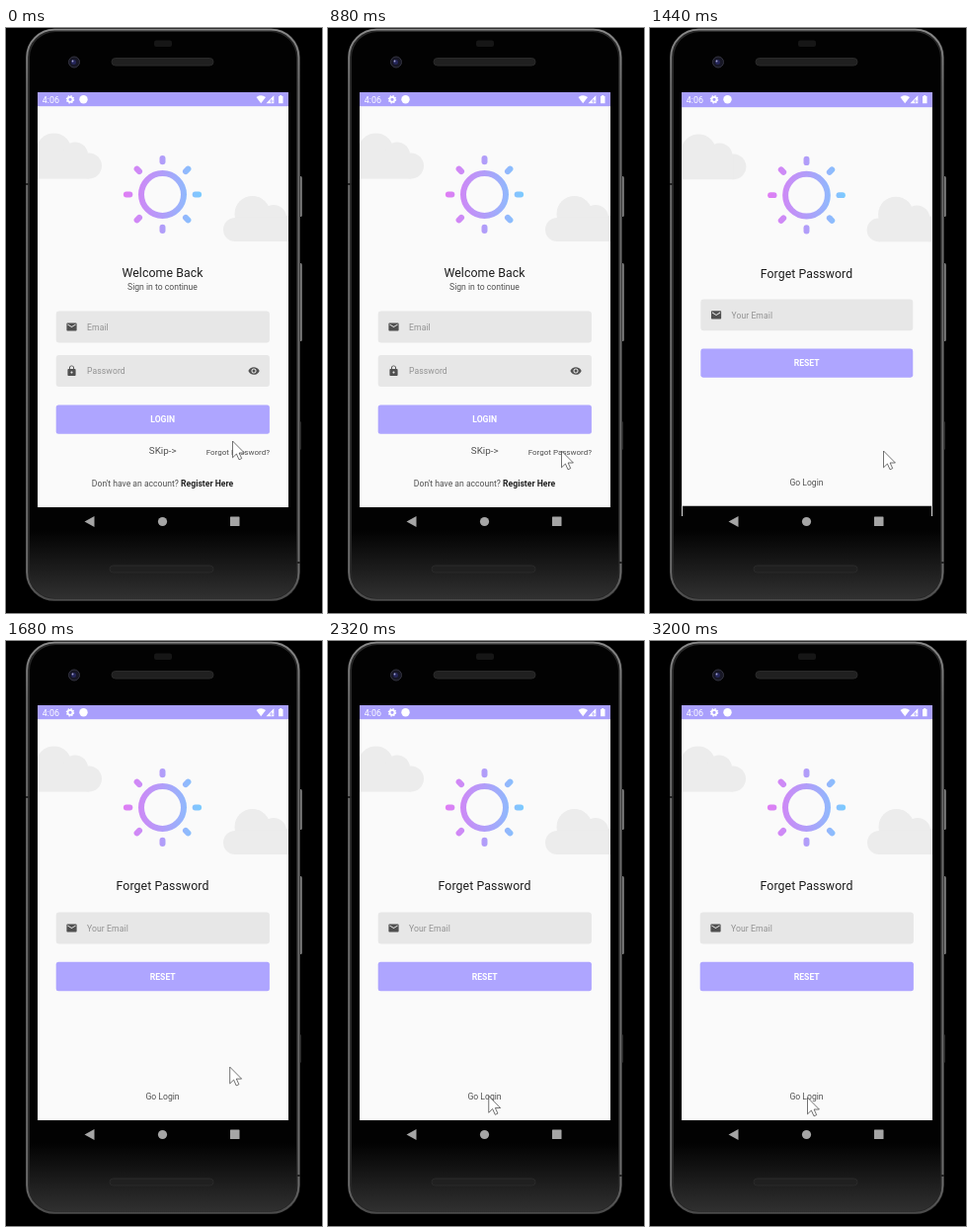
Animation, 320 px wide and 592 px high, one loop 3.28 s. Source, as an HTML page:

```html
<!DOCTYPE html>
<html lang="en">
<head>
<meta charset="utf-8">
<title>Login and password reset</title>
<style>
  html, body { margin: 0; width: 100%; height: 100%; overflow: hidden; background: #000; }
  svg { display: block; width: 320px; height: 592px; }
  text { font: 8.62px Roboto, sans-serif; fill: #505050; }
  .mid { text-anchor: middle; }
  .title { font-size: 12.31px; letter-spacing: .09px; fill: #1c1c1c; }
  .hint { letter-spacing: .1px; fill: #929292; }
  .button { font-weight: 700; fill: #fff; }
  .bold { font-weight: 700; fill: #222; }
</style>
</head>
<body>
<svg viewBox="0 0 320 592" xmlns="http://www.w3.org/2000/svg">
  <defs>
    <linearGradient id="sunFill" gradientUnits="userSpaceOnUse" x1="119" y1="0" x2="198" y2="0">
      <stop stop-color="#e07df4"/><stop offset=".5" stop-color="#b19df9"/><stop offset="1" stop-color="#7bcbff"/>
    </linearGradient>
    <linearGradient id="rim" x1="0" y1="0" x2="0" y2="1">
      <stop stop-color="#8a8a8a"/><stop offset=".1" stop-color="#6c6c6c"/>
      <stop offset=".95" stop-color="#6c6c6c"/><stop offset="1" stop-color="#4a4a4a"/>
    </linearGradient>
    <linearGradient id="glass" x1="0" y1="0" x2="0" y2="1">
      <stop stop-color="#020202"/><stop offset=".88" stop-color="#020202"/><stop offset="1" stop-color="#303030"/>
    </linearGradient>
    <linearGradient id="key" x1="0" y1="0" x2="1" y2="0">
      <stop stop-color="#444"/><stop offset=".6" stop-color="#8c8c8c"/><stop offset="1" stop-color="#555"/>
    </linearGradient>
    <clipPath id="screen"><rect x="32" y="65" width="254" height="420"/></clipPath>
    <path id="mail" d="M20 4H4c-1.1 0-2 .9-2 2v12c0 1.1.9 2 2 2h16c1.1 0 2-.9 2-2V6c0-1.1-.9-2-2-2zm0 4l-8 5-8-5V6l8 5 8-5v2z"/>
    <path id="lock" d="M18 8h-1V6c0-2.76-2.24-5-5-5S7 3.24 7 6v2H6c-1.1 0-2 .9-2 2v10c0 1.1.9 2 2 2h12c1.1 0 2-.9 2-2V10c0-1.1-.9-2-2-2zm-6 9c-1.1 0-2-.9-2-2s.9-2 2-2 2 .9 2 2-.9 2-2 2zm3.1-9H8.9V6c0-1.71 1.39-3.1 3.1-3.1s3.1 1.39 3.1 3.1v2z"/>
    <path id="eye" d="M12 4.5C7 4.5 2.73 7.61 1 12c1.73 4.39 6 7.5 11 7.5s9.27-3.11 11-7.5c-1.73-4.39-6-7.5-11-7.5zM12 17c-2.76 0-5-2.24-5-5s2.24-5 5-5 5 2.24 5 5-2.24 5-5 5zm0-8c-1.66 0-3 1.34-3 3s1.34 3 3 3 3-1.34 3-3-1.34-3-3-3z"/>
    <g id="cloud" fill="#ececec">
      <circle cx="31" cy="140.5" r="12"/>
      <circle cx="48.5" cy="124.5" r="18"/>
      <circle cx="70" cy="128.5" r="13"/>
      <circle cx="84" cy="139.5" r="13"/>
      <rect x="31" y="128" width="53" height="24.5"/>
    </g>
    <g id="backdrop">
      <rect x="32" y="65" width="254" height="420" fill="#fafafa"/>
      <use href="#cloud"/>
      <use href="#cloud" x="201" y="63.5"/>
      <g id="sun" fill="none" stroke="url(#sunFill)" stroke-width="6" stroke-linecap="round">
        <circle cx="158.5" cy="168.5" r="21.5"/>
      </g>
    </g>
  </defs>

  <rect width="320" height="592"/>
  <g fill="url(#key)">
    <rect x="295" y="150" width="5" height="41" rx="1.5"/>
    <rect x="295" y="238" width="5" height="79" rx="1.5"/>
    <rect x="295" y="398" width="3.5" height="29" rx="1"/>
  </g>
  <rect x="20" y="0.5" width="278" height="579.5" rx="29" fill="#262626"/>
  <rect x="21.2" y="1.7" width="275.2" height="577" rx="28" fill="none" stroke="url(#rim)" stroke-width="1.8"/>
  <rect x="24" y="4" width="270" height="573" rx="26" fill="url(#glass)"/>
  <g fill="#222">
    <rect x="20" y="157" width="3.5" height="2"/>
    <rect x="294.5" y="540" width="3.5" height="2"/>
  </g>
  <rect x="150" y="12.5" width="18" height="6.5" rx="2" fill="#161616"/>
  <rect x="107" y="30.5" width="103" height="7.5" rx="3.75" fill="#202020" stroke="#2a2a2a"/>
  <rect x="105" y="544" width="105" height="7" rx="3.5" fill="#202020" stroke="#2a2a2a"/>
  <circle cx="69" cy="34.5" r="5.5" fill="#171725" stroke="#343440"/>
  <circle cx="68.5" cy="34.5" r="2.5" fill="#25265a"/>
  <circle cx="67.5" cy="33.5" r=".9" fill="#aaaad4"/>

  <g fill="#a5a5a5">
    <path d="M79.5 499.5L89.5 494V505Z"/>
    <circle cx="158.5" cy="499.5" r="4.6"/>
    <rect x="227" y="494.5" width="9.5" height="9.5" rx=".6"/>
  </g>

  <g clip-path="url(#screen)">
    <rect x="32" y="65" width="254" height="420"/>
    <g id="login"><use href="#backdrop"/></g>
    <g id="reset"><use href="#backdrop"/></g>
  </g>
  <path id="edges" d="M32.5 80V494M285.5 80V494" stroke="#ddd"/>

  <rect id="status" x="32" y="65" width="254" fill="#a99ffc"/>
  <text x="36.8" y="75.5" style="font-size:8.9px;fill:#fff">4:06</text>
  <g fill="none" stroke="#fff">
    <circle cx="65" cy="72.3" r="2.5" stroke-width="1.8"/>
    <circle cx="65" cy="72.3" r="3.6" stroke-width="1.3" stroke-dasharray="1.41"/>
  </g>
  <g fill="#fff">
    <circle cx="78.5" cy="72.2" r="4.2"/>
    <path d="M253.5 70Q258.2 66.5 263 70L258.2 76.2Z"/>
    <path d="M263.5 76.2L271.3 68.2V76.2Z"/>
    <path d="M276 69H277.2V68H279.3V69H280.5V76.3H276Z"/>
  </g>
  <path d="M268.7 72V76M267 74H271" stroke="#a99ffc" stroke-width=".7"/>

  <path id="cursor" d="M0 0V16.8L3.9 13L6.5 18.8L9.2 17.6L6.6 12H11.9Z" fill="#fff" stroke="#444" stroke-width=".75"/>
</svg>
<script>
const LOOP = 3280, STEP = 80, OPEN_AT = 1360;
const $ = id => document.getElementById(id);

const add = (id, markup) => $(id).insertAdjacentHTML('beforeend', markup);
const label = (x, y, text, type = '', style = '') =>
  `<text x="${x}" y="${y}" class="${type}" style="${style}">${text}</text>`;
const icon = (name, x, y) =>
  `<use href="#${name}" fill="#505050" transform="translate(${x} ${y}) scale(.51) translate(-12 -12)"/>`;
const field = (y, name, hint) =>
  `<rect x="50.7" y="${y}" width="216.2" height="32" rx="3" fill="#e7e7e7"/>` +
  icon(name, 66.5, y + 16) + label(82, y + 19.2, hint, 'hint');
const button = (y, text) =>
  `<rect x="50.7" y="${y}" width="216.2" height="29.4" rx="2.5" fill="#aea5ff"/>` +
  label(158.7, y + 17.8, text, 'button mid');

for (let i = 0; i < 8; i++) {
  const a = i * Math.PI / 4;
  const [from, to] = [33.2, 36.6].map(r => `${158.5 + r * Math.cos(a)} ${168.5 + r * Math.sin(a)}`);
  add('sun', `<path d="M${from}L${to}"/>`);
}

add('login',
  label(158.5, 252.4, 'Welcome Back', 'title mid') +
  label(158.5, 265.3, 'Sign in to continue', 'mid') +
  field(286.5, 'mail', 'Email') +
  field(331, 'lock', 'Password') + icon('eye', 251, 347) +
  button(381.4, 'LOGIN') +
  label(158.7, 430.5, 'SKip-&gt;', 'mid', 'font-size:9.85px') +
  label(267, 431.6, 'Forgot Password?', '', 'font-size:8px;text-anchor:end') +
  label(158.5, 463.8, 'Don\'t have an account? <tspan class="bold">Register Here</tspan>', 'mid'));

add('reset',
  label(158.5, 252.4, 'Forget Password', 'title mid') +
  field(274.5, 'mail', 'Your Email') +
  button(324.8, 'RESET') +
  label(158.5, 463.8, 'Go Login', 'mid'));

// time, x, y of the pointer tip
const route = [
  [0, 229.5, 418], [400, 236.5, 428], [1600, 236.5, 428],
  [2000, 187.5, 443.5], [2240, 166, 459], [2400, 159.5, 462], [LOOP, 159.5, 462]
];

function pointerAt(t) {
  const i = route.findIndex(p => p[0] > t);
  const [a, b] = [route[i - 1], route[i]];
  const k = (t - a[0]) / (b[0] - a[0]);
  return [1, 2].map(n => a[n] + (b[n] - a[n]) * k);
}

function zoom(id, scale) {
  $(id).setAttribute('transform', `translate(158.8 275) scale(${scale}) translate(-158.8 -275)`);
}

function draw(time) {
  const t = Math.floor(time % LOOP / STEP) * STEP;
  const since = t - OPEN_AT, opened = since >= 0;
  const settling = opened && since < 2 * STEP;
  $('login').style.display = opened ? 'none' : '';
  $('reset').style.display = opened ? '' : 'none';
  $('edges').style.display = settling ? '' : 'none';
  zoom('reset', settling ? 1 - .024 * Math.pow(.25, since / STEP) : 1);
  $('status').setAttribute('height', settling ? 15.2 : 14.2);
  $('cursor').setAttribute('transform', `translate(${pointerAt(t)})`);
}

const start = performance.now();
function tick() {
  draw(performance.now() - start);
  requestAnimationFrame(tick);
}
draw(0);
requestAnimationFrame(tick);
</script>
</body>
</html>
```
